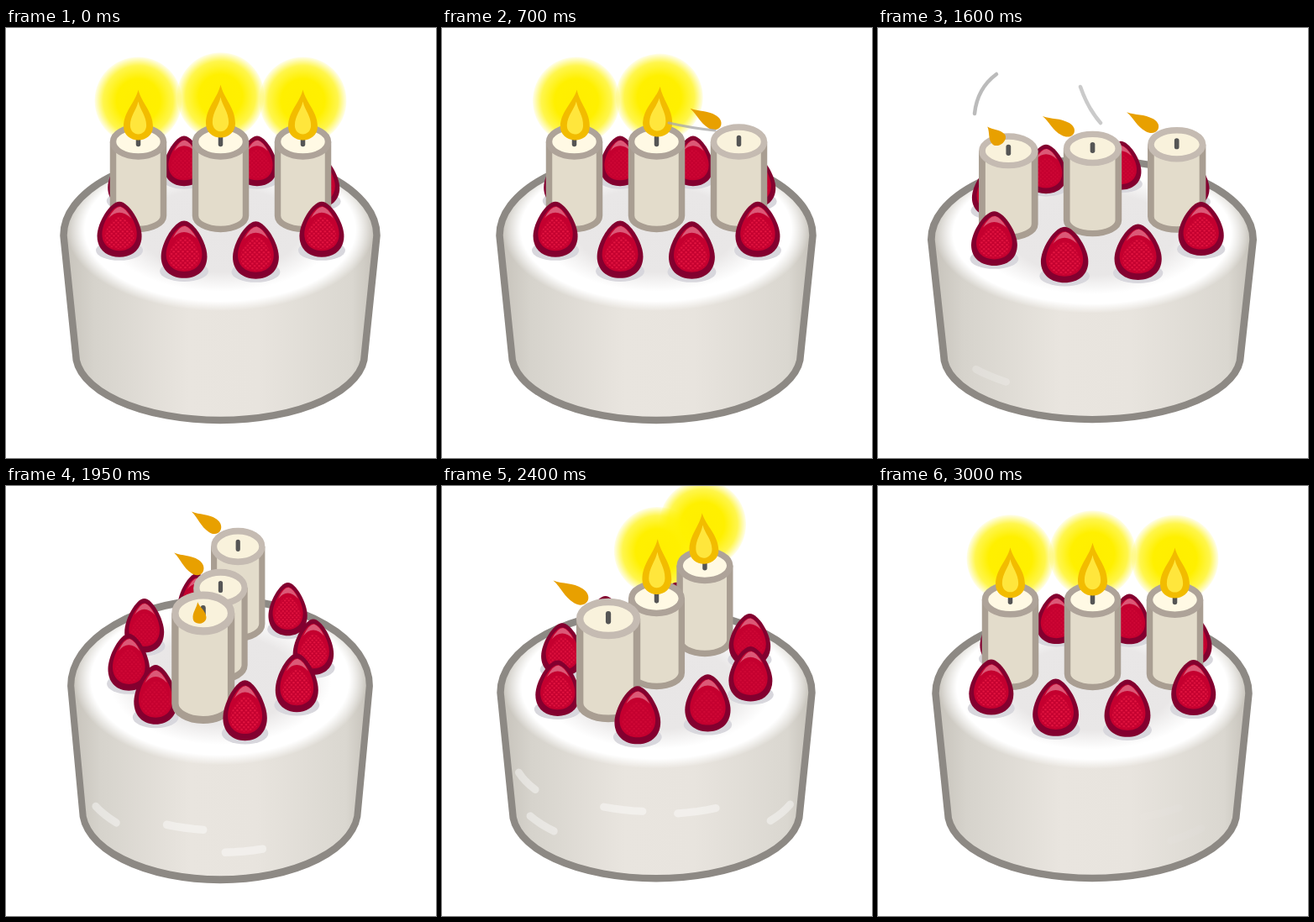
Recreate the animation shown at these times as an HTML page. Size 512x512 px, loop 3.05 s.

```html
<!DOCTYPE html>
<html lang="en">
<head>
<meta charset="utf-8">
<title>Birthday cake</title>
<style>
html, body { margin: 0; width: 100%; height: 100%; overflow: hidden; background: #fff; }
svg { display: block; width: 100%; height: 100%; }
</style>
</head>
<body>
<svg id="stage" viewBox="0 0 512 512">
  <defs>
    <linearGradient id="side" gradientUnits="userSpaceOnUse" x1="68" x2="442" y1="0" y2="0">
      <stop offset="0" stop-color="#c6c2ba"/>
      <stop offset=".1" stop-color="#d6d3cc"/>
      <stop offset=".4" stop-color="#e9e5df"/>
      <stop offset=".62" stop-color="#e8e4de"/>
      <stop offset=".92" stop-color="#dad7d0"/>
      <stop offset="1" stop-color="#c4c0b8"/>
    </linearGradient>
    <radialGradient id="icing">
      <stop offset="0" stop-color="#e8e6e6"/>
      <stop offset=".52" stop-color="#e9e7e7"/>
      <stop offset=".76" stop-color="#fff"/>
      <stop offset=".88" stop-color="#fff"/>
      <stop offset="1" stop-color="#fff" stop-opacity="0"/>
    </radialGradient>
    <radialGradient id="glow">
      <stop offset="0" stop-color="#ffee00"/>
      <stop offset=".5" stop-color="#fff000"/>
      <stop offset=".8" stop-color="#fff200" stop-opacity=".7"/>
      <stop offset="1" stop-color="#fff200" stop-opacity=".08"/>
    </radialGradient>
    <pattern id="seeds" width="8" height="9" patternUnits="userSpaceOnUse">
      <circle cx="2" cy="2" r="1.9" fill="#ee1c46"/>
      <circle cx="6" cy="6.5" r="1.9" fill="#ee1c46"/>
    </pattern>
  </defs>
  <g id="scene">
    <path d="M68.5 247A186.5 98 0 0 1 441.5 247L427 388A172 79 0 0 1 83 388Z" fill="url(#side)"/>
    <ellipse cx="255" cy="240" rx="183" ry="97" fill="url(#icing)"/>
    <g id="shine" fill="none" stroke="#fff" stroke-width="9" stroke-linecap="round"/>
    <path d="M68.5 247A186.5 98 0 0 1 441.5 247L427 388A172 79 0 0 1 83 388Z" fill="none" stroke="#8d8984" stroke-width="8.5"/>
    <g id="halos"/>
    <g id="items"/>
  </g>
  <g id="smoke" fill="none" stroke="#aaa" stroke-linecap="round"/>
</svg>
<script>
const LOOP = 3050, STEP = 50, CX = 255.5, TILT = 0.49, RAD = Math.PI / 180;
const $ = id => document.getElementById(id);

function add(parent, tag, attrs = {}) {
  const el = document.createElementNS('http://www.w3.org/2000/svg', tag);
  set(el, attrs);
  parent.append(el);
  return el;
}
function set(el, attrs) {
  for (const k in attrs) el.setAttribute(k, attrs[k]);
}

// keys: [time, value, value, ...], eased with a half cosine
function tween(keys, t) {
  let i = 1;
  while (i < keys.length - 1 && t > keys[i][0]) i++;
  const a = keys[i - 1], b = keys[i];
  const p = Math.min(1, Math.max(0, (t - a[0]) / (b[0] - a[0])));
  const e = (1 - Math.cos(Math.PI * p)) / 2;
  return a.slice(1).map((v, k) => v + (b[k + 1] - v) * e);
}

const halfWidth = [[0, 190.5], [1520, 190.5], [1680, 201], [1930, 181.5],
  [2220, 195.5], [2600, 182.3], [2900, 191.3], [3000, 190.5], [LOOP, 190.5]];

// flame pose: x, y, lean, width, height, glow
const REST = [0, 0, 0, 1, 1, 1], TALL = [0, -3, 0, 1, 1.05, 1];
const BLOWN = [-22, -16, -59, .5, .7, 0];
const candles = [
  { angle: 180, r: 98, keys: [
    [0, ...REST], [700, 0, 0, 3, 1, 1, 1], [1300, 0, 0, 12, 1, 1.25, 1],
    [1450, -18, -14, -55, .5, .65, 0], [1600, -7, -7, -40, .52, .44, 0],
    [1950, -3, 12, -8, .41, .35, 0], [2150, 0, 10, 0, .42, .37, 0],
    [2350, 0, 0, -5, 1, 1, 1], [2650, -2, -2, 25, 1, 1.02, 1],
    [2850, 0, 0, -5, 1, 1, 1], [3000, ...REST], [LOOP, ...REST]] },
  { angle: 0, r: 0, keys: [
    [0, ...TALL], [700, 0, -4, 4, 1, 1, 1], [1080, 0, -3, 8, .95, 1.35, 1],
    [1200, ...BLOWN], [2000, ...BLOWN], [2150, 0, 3, 0, .52, .55, .9],
    [2300, 0, -3, 0, 1, 1.1, 1], [2650, 0, -2, 6, 1, 1.07, 1],
    [3000, ...TALL], [LOOP, ...TALL]] },
  { angle: 0, r: 98, keys: [
    [0, ...REST], [400, 0, 0, 2, 1, 1, 1], [560, 0, 0, 8, 1, 1.1, 1],
    [650, ...BLOWN], [2700, ...BLOWN], [2850, 0, 2, -8, .6, .6, 1],
    [2950, 0, 0, 3, 1, 1.04, 1], [3000, ...REST], [LOOP, ...REST]] }
];
const berries = [[26, 130], [68, 116], [112, 116], [152, 124], [206, 134], [248, 116], [291, 117], [334, 134]]
  .map(([angle, r]) => ({ angle, r }));

// start angle and height of the light streaks on the side
const streaks = [[-115, 350], [-73, 331], [-48, 356], [-159, 311], [-241, 319], [-229, 355], [-189, 308]];

// path, width, first and last moment
const puffs = [
  ['M270 113Q296 119 325 122', 3, 580, 820],
  ['M241 70Q250 96 265 113', 4.5, 1200, 1760],
  ['M141 55Q118 72 115 102', 4.5, 1420, 1760]
];

const DROP = 'M0-60C4-44 17.5-34 17.5-16C17.5-6 9 0 0 0C-9 0-17.5-6-17.5-16C-17.5-34-4-44 0-60Z';
const BERRY = 'M0-33C11-33 26.5-8 26.5 8C26.5 24 15 33 0 33C-15 33-26.5 24-26.5 8C-26.5-8-11-33 0-33Z';

for (const c of candles) {
  c.halo = add($('halos'), 'circle', { r: 52, fill: 'url(#glow)' });
  c.el = add($('items'), 'g');
  add(c.el, 'path', { d: 'M-30-108V-20A30 16 0 0 0 30-20V-108', fill: '#e3dccb', stroke: '#a99e92', 'stroke-width': 7.5 });
  c.top = add(c.el, 'ellipse', { cy: -108, rx: 30, ry: 17.5, 'stroke-width': 7.5 });
  add(c.el, 'path', { d: 'M0-113V-105', stroke: '#555', 'stroke-width': 5.5, 'stroke-linecap': 'round' });
  c.flame = add(c.el, 'g');
  c.outer = add(c.flame, 'path', { d: DROP });
  c.inner = add(c.flame, 'path', { d: DROP, fill: '#ffe63c', transform: 'translate(0 -7) scale(.55 .65)' });
}
for (const b of berries) {
  b.el = add($('items'), 'g');
  add(b.el, 'ellipse', { cy: 25, rx: 28, ry: 12, fill: '#d8d7dd' });
  add(b.el, 'path', { d: BERRY, fill: '#83002f' });
  add(b.el, 'path', { d: BERRY, fill: '#c4002f', transform: 'translate(0 -1) scale(.78 .8)' });
  add(b.el, 'path', { d: BERRY, fill: 'url(#seeds)', transform: 'translate(0 4) scale(.66 .58)', opacity: b.angle > 180 ? .75 : .3 });
  add(b.el, 'path', { d: 'M-13-13Q-6-27 1-27Q8-25 14-13Q7-20 0-20Q-7-20-13-13Z', fill: '#e8899e', opacity: .65 });
}
const shines = streaks.map(() => add($('shine'), 'path'));
const wisps = puffs.map(([d, w]) => add($('smoke'), 'path', { d, 'stroke-width': w }));

function place(item, turn) {
  const a = (item.angle + turn) * RAD;
  item.x = CX + item.r * Math.cos(a);
  item.depth = -item.r * Math.sin(a);
  item.front = item.depth / (item.r || 1);
}

function drawCandle(c, t) {
  const size = 1 + .17 * Math.max(0, c.front);
  const y = 243.5 + c.depth * TILT;
  const [fx, fy, lean, w, h, glow] = tween(c.keys, t);
  const lit = glow > .3;
  set(c.el, { transform: `translate(${c.x} ${y}) scale(${size})` });
  set(c.top, { fill: lit ? '#fff9e4' : '#f9f2dc', stroke: lit ? '#aea399' : '#c5bbb2' });
  set(c.flame, { transform: `translate(${fx} ${fy - 110}) rotate(${lean}) scale(${w} ${h})` });
  set(c.outer, { fill: lit ? '#f2bc00' : '#e8a000' });
  set(c.inner, { opacity: glow });
  const rise = 47 * Math.max(1, h);
  set(c.halo, {
    cx: c.x + size * (fx + rise * Math.sin(lean * RAD)),
    cy: y + size * (fy - 110 - rise * Math.cos(lean * RAD)),
    opacity: glow
  });
}

function drawBerry(b) {
  const size = .97 + .07 * b.front;
  set(b.el, { transform: `translate(${b.x} ${211 + b.depth * TILT}) scale(${size})` });
}

function drawShine(turn, spin) {
  streaks.forEach(([start, h], i) => {
    const mid = start + turn * .75;
    const points = [-8, -4, 0, 4, 8].map(d => {
      const a = (mid + d) * RAD;
      return (CX + 172 * Math.sin(a)).toFixed(1) + ' ' + (h + 80 * Math.cos(a)).toFixed(1);
    });
    const facing = Math.cos(mid * RAD);
    set(shines[i], {
      d: 'M' + points.join('L'),
      opacity: facing > .38 ? .4 * Math.min(1, 2 * Math.sin(Math.PI * spin)) : 0
    });
  });
}

function draw(t) {
  const sx = tween(halfWidth, t)[0] / 190.5;
  const spin = Math.min(1, Math.max(0, (t - 1475) / 1550));
  const turn = 180 * (1 - Math.cos(Math.PI * spin));
  set($('scene'), { transform: `translate(255 432) scale(${sx} ${1 / sx}) translate(-255 -432)` });

  const items = [...candles, ...berries];
  items.forEach(item => place(item, turn));
  candles.forEach(c => drawCandle(c, t));
  berries.forEach(drawBerry);
  items.sort((a, b) => a.depth - b.depth).forEach(item => $('items').append(item.el));

  drawShine(turn, spin);
  puffs.forEach(([, , from, to], i) => {
    const p = (t - from) / (to - from);
    set(wisps[i], { opacity: p > 0 && p < 1 ? .8 * Math.sin(Math.PI * p) : 0 });
  });
}

const begin = performance.now();
function frame() {
  const t = (performance.now() - begin) % LOOP;
  draw(Math.floor(t / STEP) * STEP);
  requestAnimationFrame(frame);
}
frame();
</script>
</body>
</html>
```
